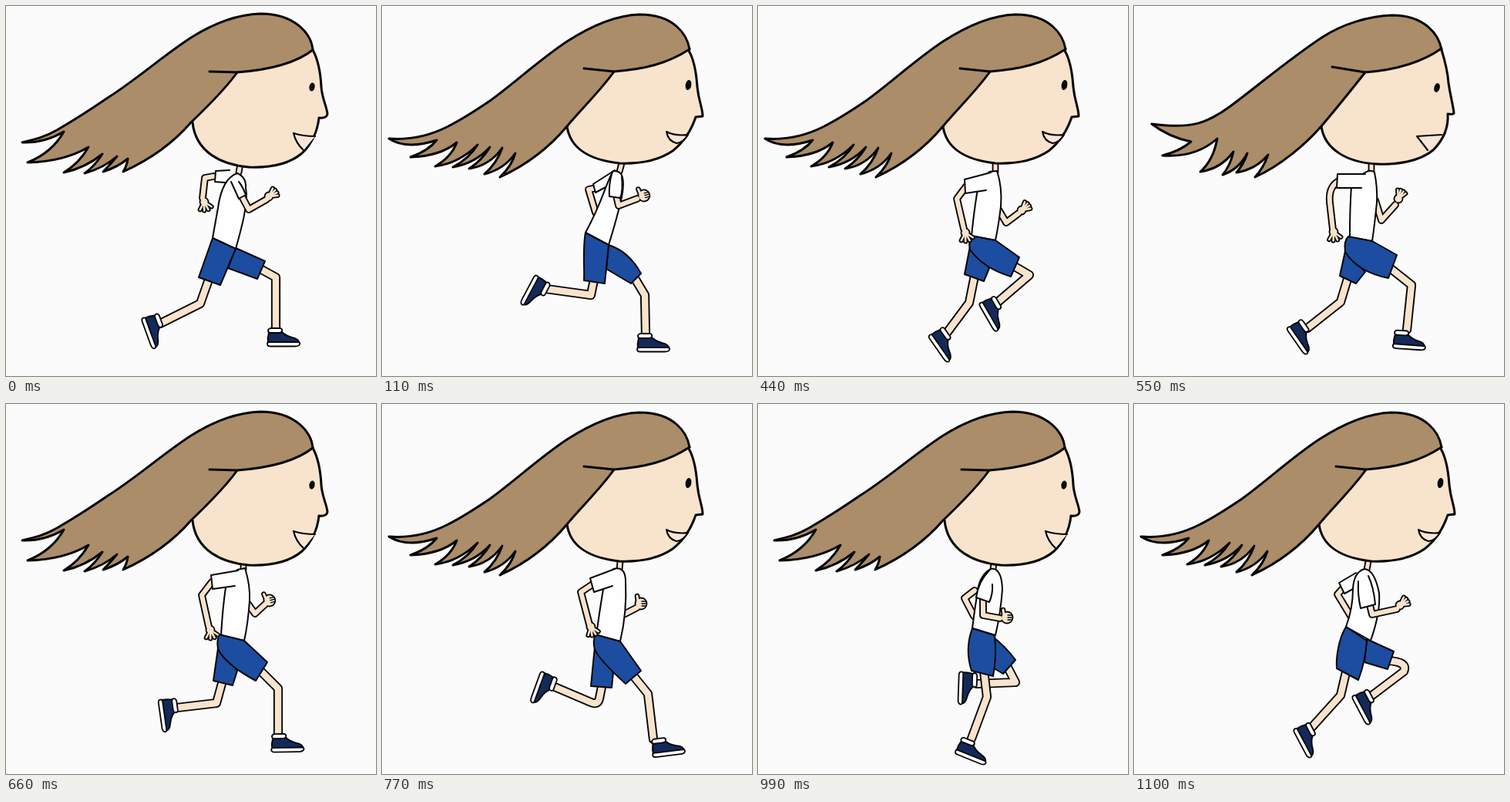
Recreate the animation shown at these times as an HTML page. Size 480 by 480 pixels, loop 1.21 s.

```html
<!DOCTYPE html>
<html lang="en">
<head>
<meta charset="utf-8">
<title>Running girl</title>
<style>
  html, body { margin: 0; width: 100%; height: 100%; overflow: hidden; background: #fbfbfb; }
  svg { display: block; width: 100vw; height: 100vh; }
  path { stroke-linecap: round; stroke-linejoin: round; }
</style>
</head>
<body>
<svg id="stage" viewBox="0 0 480 480"></svg>
<script>
const STEP = 110;
const INK = '#050505', SKIN = '#f8e3cd', HAIR = '#ab8d69', BLUE = '#1c4da0', NAVY = '#13295a', WHITE = '#fefefe';

const shape = (d, fill, width = 2) =>
  `<path d="${d}" fill="${fill}" stroke="${INK}" stroke-width="${width}"/>`;

// A tube: the outline pass goes below the skin pass
const tube = (d, width, color) =>
  `<path d="M${d}" fill="none" stroke="${color}" stroke-width="${width}"/>`;

const limb = (d, width) => tube(d, width + 3.8, INK) + tube(d, width, SKIN);

const place = ([x, y, angle], markup) =>
  `<g transform="translate(${x} ${y}) rotate(${angle})">${markup}</g>`;

// The last number of a hand is the finger spread; 0 makes a fist
function handPass(hand, color, grow) {
  const spread = hand[3];
  if (!spread) {
    return place(hand, `<circle cx="4" r="${6.6 + grow}" fill="${color}"/>` +
      tube('0,-3 L-1,-10', 3 + 2 * grow, color));
  }
  const fingers = [-42, -14, 14, 42].map(a => {
    const r = a * spread * Math.PI / 180;
    return tube(`0,0 L${11.5 * Math.cos(r)},${11.5 * Math.sin(r)}`, 2.6 + 2 * grow, color);
  });
  return place(hand, fingers.join('') + `<circle r="${4.6 + grow}" fill="${color}"/>`);
}

const knuckles = hand => hand[3] ? '' :
  place(hand, [-3, 0, 3].map(k => tube(`5,${k} L10,${k}`, 1.3, INK)).join(''));

function arm(d, hand) {
  let low = tube(d, 9.8, INK), high = tube(d, 6, SKIN);
  if (hand) {
    low += handPass(hand, INK, 1.8);
    high += handPass(hand, SKIN, 0) + knuckles(hand);
  }
  return low + high;
}

const shoe = at => place(at,
  shape('M-8,3 Q-10,10 -9,16 L31,17 Q32,11 22,9 Q14,7 9,2 Z', NAVY) +
  shape('M-8,15 H29 Q33,15 32,18 Q31,20.5 26,20.5 H-6 Q-10,20.5 -10,17.5 Q-10,15 -8,15 Z', WHITE, 1.8) +
  shape('M-6,-3 H7 Q10,-2 9,1 Q8,3 5,3 H-6 Q-9,3 -9,0 Q-9,-2 -6,-3 Z', WHITE, 1.8));

function body(p) {
  return arm(p.farArm, p.farHand) +
    (p.farSleeve ? shape(p.farSleeve, WHITE) : '') +
    limb(p.farLeg, 8.4) + shoe(p.farShoe) + shape(p.farShorts, BLUE) +
    limb(p.neck, 5) + shape(p.torso, WHITE) +
    limb(p.leg, 8.4) + shoe(p.shoe) + shape(p.shorts, BLUE) +
    arm(p.arm, p.hand) + shape(p.sleeve, WHITE);
}

const poses = [
  {
    neck: '304,204 L302,216',
    torso: 'M300,217 C285,222 278,240 275,262 L268,301 L298,315 C305,290 315,255 311,236 Q312,222 300,217 Z',
    farSleeve: 'M290,213 L272,214 L271,228 L284,229', farArm: '269,221 L258,223 L255,249', farHand: [257, 254, 75, 1],
    sleeve: 'M292,228 L302,250 L311,245 Q307,234 302,228', arm: '306,247 L315,264 L338,251', hand: [341, 247, -35, .7],
    shorts: 'M268,301 L250,352 L278,362 L298,315 Z', farShorts: 'M298,314 L336,331 L326,354 L288,340 Z',
    leg: '264,352 L252,386 L200,412', shoe: [198, 408, 70],
    farLeg: '328,340 L350,352 L350,418', farShoe: [349, 421, 0]
  },
  {
    neck: '311,204 L308,215',
    torso: 'M300,214 C290,230 288,250 264,294 L294,310 Q305,275 311,248 Q318,212 300,214 Z',
    farSleeve: 'M302,213 L274,231 L277,242 L292,234', farArm: '279,236 L268,238 L277,268',
    sleeve: 'M298,218 Q294,232 295,247 L309,249 Q313,240 311,222', arm: '304,246 L307,259 L331,250', hand: [336, 247, -15, 0],
    shorts: 'M264,294 C260,315 263,340 262,356 L289,360 L294,310 Z', farShorts: 'M294,310 Q320,318 336,347 L323,360 L291,341 Z',
    leg: '275,355 L271,375 L213,367', shoe: [212, 367, 118],
    farLeg: '326,350 L341,375 L342,425', farShoe: [341, 428, 0]
  },
  {
    neck: '309,206 L308,215',
    torso: 'M302,214 Q314,211 315,232 Q312,260 296,307 L266,296 Q280,260 285,240 Q291,218 302,214 Z',
    farArm: '281,245 L271,258 L280,282',
    sleeve: 'M300,216 Q286,232 284,248 L300,253 Q305,242 306,232', arm: '292,250 L288,275 L308,291', hand: [312, 293, 20, 1],
    shorts: 'M266,296 Q263,320 278,357 L304,354 L296,307 Z', farShorts: 'M296,307 Q312,320 325,345 L308,356 L290,340 Z',
    leg: '291,350 L298,374 L236,364', shoe: [234, 361, 108],
    farLeg: '315,345 L322,380 L314,430', farShoe: [311, 433, 0]
  },
  {
    neck: '307,207 L307,215',
    torso: 'M303,214 Q313,212 314,230 C316,250 302,285 297,302 L268,297 Q274,270 278,248 Q288,220 303,214 Z',
    farArm: '297,284 L314,296', farHand: [318, 299, 20, 1],
    sleeve: 'M302,216 C288,224 280,235 274,248 L290,254 Q293,243 298,236', arm: '281,251 L273,275 L278,311', hand: [280, 316, 60, 1],
    shorts: 'M268,298 Q272,312 280,325 L300,349 L317,341 L297,302 Z', farShorts: 'M267,298 Q262,314 272,325 L290,352 L300,349 L290,310 Z',
    leg: '309,343 Q328,370 315,369 L262,359', shoe: [259, 355, 100],
    farLeg: '304,348 L297,385 L285,434', farShoe: [277, 438, 1]
  },
  {
    neck: '308,205 L308,215',
    torso: 'M300,215 L310,214 Q317,235 315,260 Q312,285 308,304 L277,298 Q281,260 285,238 Z',
    farArm: '312,264 L322,281 L338,269', farHand: [342, 265, -40, .7],
    sleeve: 'M302,216 L268,225 L269,243 L296,239', arm: '270,234 L258,250 L267,289', hand: [269, 294, 75, 1],
    shorts: 'M276,298 L308,304 L339,326 L328,351 Q292,340 275,316 Q273,306 276,298 Z', farShorts: 'M275,312 L268,348 L293,357 L300,340 Z',
    leg: '328,335 L352,349 L310,385', shoe: [309, 385, 60],
    farLeg: '281,350 L274,385 L245,424', farShoe: [243, 425, 55]
  },
  {
    neck: '308,205 L308,215',
    torso: 'M298,217 Q308,211 312,216 Q316,235 315,255 Q312,285 309,305 L280,300 Q280,260 282,234 Z',
    farArm: '313,252 L321,278 L339,258', farHand: [343, 250, -65, .7],
    sleeve: 'M300,218 L264,218 L263,236 L295,236', arm: '264,228 Q252,236 254,255 L258,290', hand: [259, 293, 78, 1],
    shorts: 'M278,299 L309,305 L341,323 L330,353 Q290,345 274,319 Q272,305 278,299 Z', farShorts: 'M274,318 L267,350 L288,360 L300,345 Z',
    leg: '331,339 L360,362 L354,420', shoe: [347, 424, 4],
    farLeg: '277,354 L268,384 L225,418', farShoe: [220, 415, 55]
  },
  {
    neck: '308,205 L308,215',
    torso: 'M300,215 L310,213 Q317,235 316,255 Q314,285 309,307 L279,300 Q281,265 285,238 Z',
    farArm: '313,258 L323,272 L336,260', farHand: [338, 256, -15, 0],
    sleeve: 'M301,216 L266,222 L268,240 L297,236', arm: '267,231 L254,248 L263,289', hand: [265, 293, 75, 1],
    shorts: 'M277,299 L309,307 L339,335 L324,359 Q285,338 275,318 Q273,306 277,299 Z', farShorts: 'M275,317 L269,359 L294,365 L300,346 Z',
    leg: '328,344 L353,369 L353,428', shoe: [354, 431, -1],
    farLeg: '281,359 L273,388 L222,394', farShoe: [219, 391, 82]
  },
  {
    neck: '309,204 L308,215',
    torso: 'M300,214 Q316,210 316,230 Q318,270 309,308 L278,300 Q282,270 287,240 Z',
    farArm: '308,276 L331,264', farHand: [332, 259, 0, 0],
    sleeve: 'M302,214 L270,226 L275,244 L299,236', arm: '273,234 L258,244 L269,286', hand: [271, 289, 70, .9],
    shorts: 'M277,299 L309,308 L336,346 L316,363 Q280,330 276,318 Q273,308 277,299 Z', farShorts: 'M276,315 L271,366 L298,368 L300,348 Z',
    leg: '324,350 L345,376 L352,435', shoe: [359, 437, -7],
    farLeg: '286,362 L282,382 Q280,391 271,387 L224,367', farShoe: [222, 363, 110]
  },
  {
    neck: '308,205 L308,214',
    torso: 'M303,213 Q316,212 315,240 Q314,270 308,294 L281,290 Q280,260 287,240 Z',
    farArm: '306,284 L313,286', farHand: [317, 287, 0, 0],
    sleeve: 'M303,213 C290,218 278,228 269,240 L279,253 L300,237', arm: '273,247 L260,256 L286,283', hand: [289, 285, 10, 0],
    shorts: 'M277,291 Q290,290 309,294 Q324,315 331,337 L306,351 Q285,325 276,300 Z', farShorts: 'M277,300 L290,347 L303,347 L295,320 Z',
    leg: '317,342 L336,378 L324,442', shoe: [321, 443, 25],
    farLeg: '306,343 Q308,375 299,368 L266,341', farShoe: [267, 335, 113]
  },
  {
    neck: '306,205 L305,215',
    torso: 'M302,214 Q316,212 317,240 Q315,270 308,300 L278,291 Q282,260 286,236 Q291,219 302,214 Z',
    farArm: '281,242 L268,252 L280,275',
    sleeve: 'M300,216 Q286,230 283,251 L300,257 Q305,246 304,234', arm: '292,253 L292,274 L314,278', hand: [319, 277, 0, 0],
    shorts: 'M278,291 Q268,318 277,346 L305,353 Q310,328 307,300 Z', farShorts: 'M302,300 Q320,313 334,332 L318,350 L298,338 Z',
    leg: '293,346 L297,380 L277,434', shoe: [272, 438, 22],
    farLeg: '322,338 L334,361 L284,363', farShoe: [281, 358, 92]
  },
  {
    neck: '304,204 L302,215',
    torso: 'M299,214 Q285,218 284,240 Q284,265 275,289 L307,307 Q320,270 318,245 Q312,215 299,214 Z',
    farSleeve: 'M288,219 L266,232 L273,246 L284,240', farArm: '271,239 L264,247 L281,275',
    sleeve: 'M291,230 Q290,248 294,265 L313,260 Q311,238 304,223', arm: '306,261 L309,273 L341,266', hand: [345, 261, -35, .7],
    shorts: 'M275,289 C265,305 262,330 263,343 L291,358 Q300,335 302,307 Z', farShorts: 'M302,305 L337,321 L329,344 L299,335 Z',
    leg: '275,348 L268,378 L231,419', shoe: [229, 422, 62],
    farLeg: '328,333 Q356,334 350,347 L305,381', farShoe: [305, 379, 62]
  }
];

// Hair runs from the forehead round to the root; the fringe returns from there
const heads = [
  {
    face: 'M398,57 C404,68 408,85 409,105 C410,120 416,130 417,140 Q416,146 406,145 C404,163 396,180 384,191 C365,207 340,210 315,209 C280,206 246,190 242,151',
    hair: 'M398,57 C396,36 375,10 330,10 C297,11 267,24 240,41 C203,65 170,95 132,119 C100,141 78,154 66,161 C50,170 38,173 21,177 Q50,178 75,163 Q60,190 28,203 Q75,202 107,183 Q95,204 75,216 Q103,210 125,192 Q115,208 102,217 Q127,210 144,195 Q134,207 126,215 Q145,209 158,198 Q157,207 152,215 C185,200 215,180 240,151 C262,130 285,107',
    root: '300,86', fringe: 'C340,83 375,75 398,57', tip: '264,85',
    mouth: 'M401,169 Q385,169 373,165 Q376,178 386,187', eye: [397, 105, 10], eyeSize: [3.6, 5.6]
  },
  {
    face: 'M398,58 C405,70 408,90 409,105 C411,125 416,132 416,143 L407,144 C401,162 391,177 377,188 C358,201 335,205 308,204 C270,200 244,185 240,156',
    hair: 'M399,56 C396,38 380,11 334,11 C300,12 268,28 240,46 C205,69 172,100 140,123 C115,140 96,151 84,157 C60,169 35,174 9,172 Q32,187 71,174 Q60,188 37,196 Q75,195 97,177 Q90,196 69,208 Q100,204 124,180 Q113,198 92,209 Q121,204 140,183 Q130,200 113,211 Q140,207 156,184 Q149,204 133,218 Q158,212 173,191 Q168,208 153,222 C190,205 220,180 240,156 C262,130 285,108',
    root: '301,85', fringe: 'C340,82 370,75 399,56', tip: '262,81',
    mouth: 'M369,163 Q380,169 397,167 Q390,178 382,178 Q371,175 369,163 Z', eye: [397.5, 102.5, 10], eyeSize: [3.8, 6.6]
  },
  {
    face: 'M399,57 C403,70 407,85 408,100 C411,120 414,128 415,139 Q414,141 407,140 C408,155 403,172 388,187 C370,202 340,206 315,205 C275,203 247,185 243,156',
    hair: 'M399,57 C396,38 378,12 335,12 C303,13 270,24 245,40 C205,66 160,104 125,130 C95,152 75,160 23,153 Q45,170 74,176 Q60,188 37,194 Q80,197 108,172 Q103,200 86,215 Q113,211 129,189 Q125,207 115,219 Q136,212 147,191 Q143,204 133,216 Q158,212 174,193 Q168,210 157,222 C190,207 222,180 243,156 C265,130 285,105',
    root: '300,86', fringe: 'C340,83 375,72 399,55', tip: '257,79',
    mouth: 'M399,167 L367,169 L381,187', eye: [393, 106, 15], eyeSize: [3.6, 6]
  }
];

function head({ face, hair, root, fringe, tip, mouth, eye, eyeSize: [rx, ry] }) {
  const outline = `${hair} ${root}`;
  return `<path d="${face} L${root} ${fringe} Z" fill="${SKIN}"/>` +
    shape(face, 'none', 3) + shape(mouth, '#f8e6d8', 2.2) +
    place(eye, `<ellipse rx="${rx}" ry="${ry}" fill="${INK}"/>`) +
    `<path d="${outline} ${fringe} Z" fill="${HAIR}"/>` +
    shape(outline, 'none', 3) + tube(`${tip} L${root} ${fringe}`, 3, INK);
}

const stage = document.getElementById('stage');
const layer = (items, paint) =>
  `<g>${items.map(item => `<g visibility="hidden">${paint(item)}</g>`).join('')}</g>`;
stage.innerHTML = layer(poses, body) + layer(heads, head);
const [bodyLayer, headLayer] = stage.children;

const show = (group, index) => [...group.children].forEach((g, i) =>
  g.setAttribute('visibility', i === index ? 'visible' : 'hidden'));

const start = performance.now();
function draw() {
  const step = Math.floor((performance.now() - start) / STEP) % poses.length;
  show(bodyLayer, step);
  show(headLayer, step % heads.length);
  requestAnimationFrame(draw);
}
draw();
</script>
</body>
</html>
```
